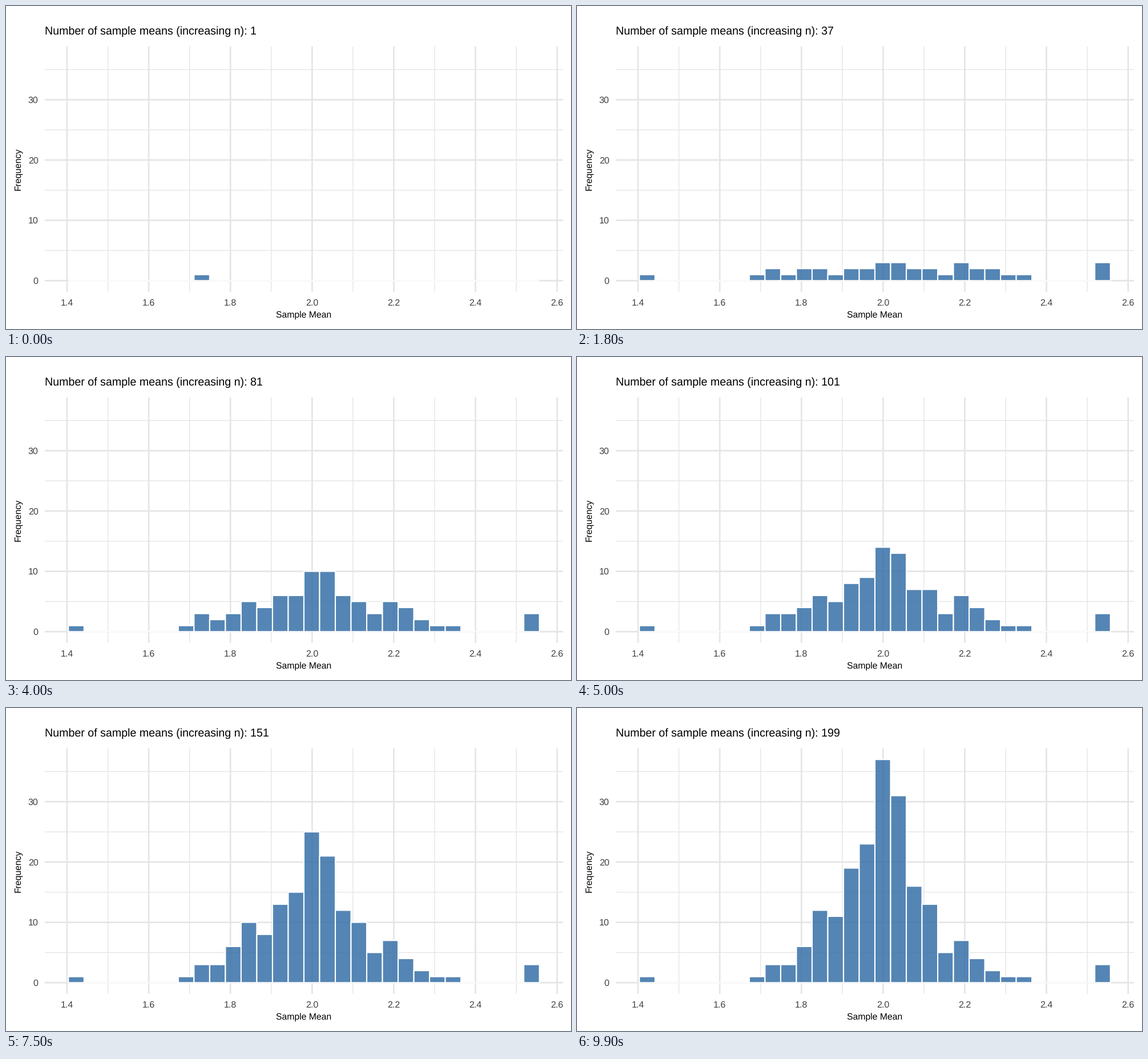
A matplotlib script that plays this animation: 990 px wide and 566 px high, repeating every 10 s.

```python
from collections import Counter
from math import exp

import matplotlib.pyplot as plt
from matplotlib.animation import FuncAnimation
from matplotlib.patches import Rectangle

W, H, DPI = 990, 566, 100
FRAMES, INTERVAL = 100, 100
BINS, CENTRE, OPENING = 30, 14.6, 8
LEFT, RIGHT, TOP, BOTTOM = 68, 976, 70.7, 500.9
GRID, TICK = "#E5E5E5", "#404040"
FILL = (54 / 255, 112 / 255, 167 / 255, 0.85)

# Histogram once every mean is in: the bulk from bin 7 on, plus two outliers
PEAK = [1, 3, 3, 6, 12, 11, 19, 23, 37, 31, 16, 13, 5, 7, 4, 2, 1, 1]
FINAL = {0: 1, **dict(enumerate(PEAK, 7)), 29: 3}

plt.rcParams.update({"font.family": "Liberation Sans", "text.hinting": "none"})


def pt(px):
    return px * 72 / DPI


def x_pos(v):
    return 107 + (v - 1.4) * 715.6


def y_pos(count):
    return 481.3 - 10.57 * count


def arrival(b, k):
    """Time of the k-th hit of bin b; far bins fill early, as n still is small."""
    d = abs(b - CENTRE)
    end = 20 + 180 * exp(-(d / 6.2) ** 4)
    power = max(0.5, 1.5 - 0.12 * d)
    return end * ((k + 0.5) / FINAL[b]) ** (1 / power)


def draw_order():
    """Bin of each sample mean, in the order they are drawn."""
    hits = [(b, k) for b, total in FINAL.items() for k in range(total)]
    hits.sort(key=lambda h: arrival(*h))
    order = [b for b, _ in hits]
    order.remove(OPENING)
    return [OPENING, *order]


ORDER = draw_order()

fig = plt.figure(figsize=(W / DPI, H / DPI), dpi=DPI, facecolor="white")
ax = fig.add_axes([0, 0, 1, 1])
ax.set_xlim(0, W)
ax.set_ylim(H, 0)
ax.axis("off")


def grid_line(xs, ys, minor):
    ax.plot(xs, ys, color=GRID, lw=pt(1.34 if minor else 2.68),
            solid_capstyle="butt", snap=False, zorder=1 if minor else 2)


def label(x, y, s, size, color="black", **kw):
    return ax.text(x, y, s, fontsize=pt(size), color=color, va="baseline", **kw)


# Grid and tick labels
for i in range(13):
    v = 1.4 + i / 10
    grid_line([x_pos(v)] * 2, [TOP, BOTTOM], i % 2)
    if i % 2 == 0:
        label(x_pos(v), 525, f"{v:.1f}", 16, TICK, ha="center")

for count in range(0, 40, 5):
    y = y_pos(count)
    grid_line([LEFT, RIGHT], [y, y], count % 10)
    if count % 10 == 0:
        label(56.5, y + 5.7, str(count), 16, TICK, ha="right")

label(522, 546, "Sample Mean", 15.8, ha="center")
label(25, 285.9, "Frequency", 15.8, ha="center", rotation=90,
      rotation_mode="anchor")
title = label(LEFT, 50, "", 19.65)

# Bars span the panel minus its 5 % padding on both sides
pad = (RIGHT - LEFT) / 1.1 * 0.05
step = (RIGHT - LEFT - 2 * pad) / BINS
bars = [
    ax.add_patch(Rectangle((LEFT + pad + i * step, y_pos(0)), step, 0,
                           facecolor=FILL, edgecolor="white", lw=pt(2.1),
                           snap=False, zorder=3))
    for i in range(BINS)
]


def update(frame):
    n = 2 * frame + 1
    counts = Counter(ORDER[:n])
    for i, bar in enumerate(bars):
        bar.set_height(y_pos(counts[i]) - y_pos(0))
    title.set_text(f"Number of sample means (increasing n): {n}")
    return [*bars, title]


anim = FuncAnimation(fig, update, frames=FRAMES, interval=INTERVAL,
                     init_func=lambda: update(0), repeat=True, repeat_delay=0)
plt.show()
```
